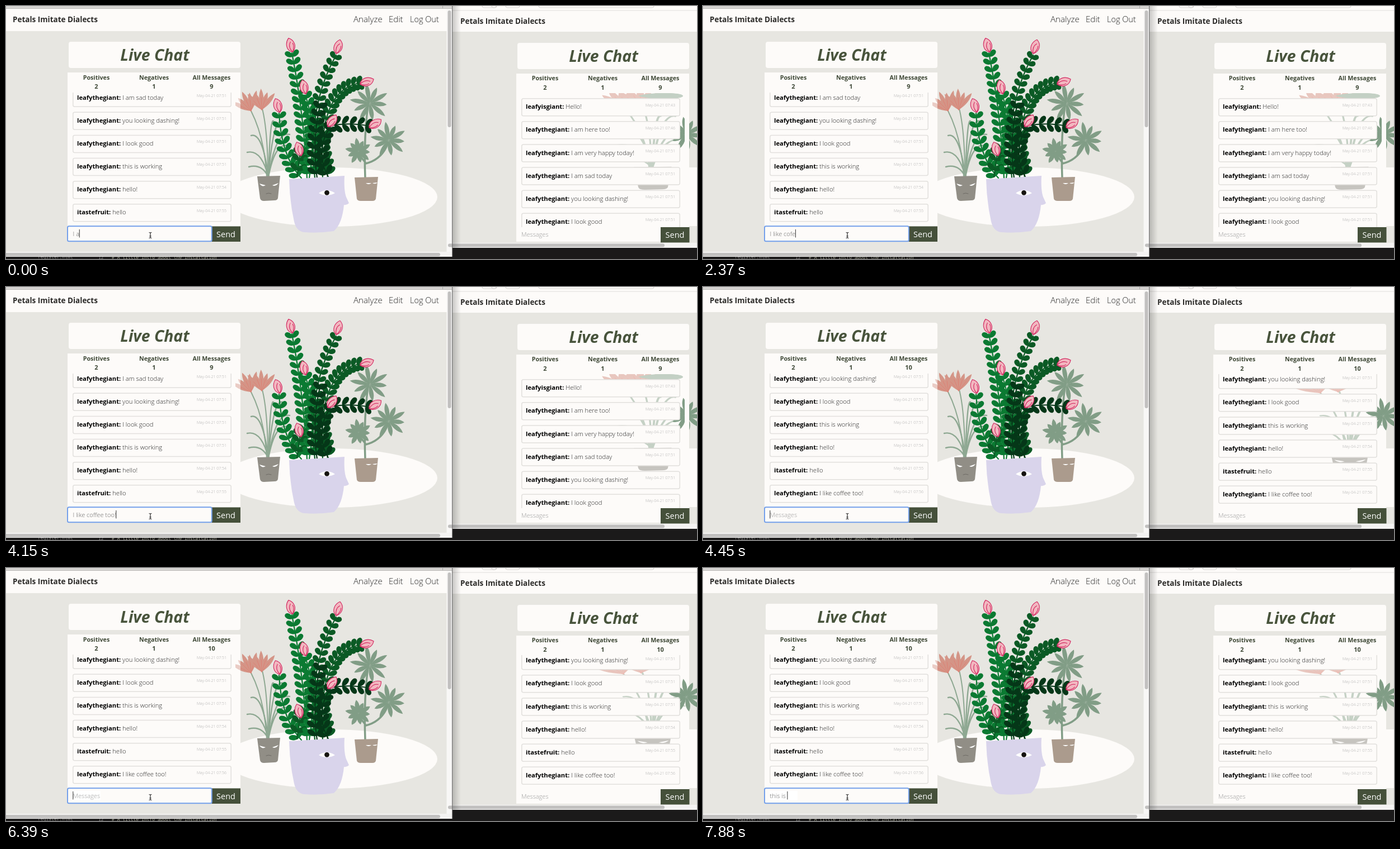
Recreate the animation shown at these times as an HTML page. Size 1235 by 453 pixels, loop 8 s.

```html
<!DOCTYPE html>
<html lang="en">
<head>
<meta charset="utf-8">
<title>Live Chat</title>
<style>
  html, body { margin: 0; width: 100%; height: 100%; overflow: hidden; background: #1b1a1a; }
  svg { display: block; font-family: "Open Sans", "Noto Sans", sans-serif; }
  text { white-space: pre; }
  .light { font-weight: 300; }
  .bold { font-weight: 700; }
</style>
</head>
<body>
<svg id="stage" width="1235" height="453" viewBox="0 0 1235 453"></svg>
<script>
const PAPER = '#fdfbf9', WALL = '#e7e6e1', OLIVE = '#45503a';
const DEG = Math.PI / 180;

const rect = (x, y, w, h, fill, more = '') =>
  `<rect x="${x}" y="${y}" width="${w}" height="${h}" fill="${fill}" ${more}/>`;
const text = (x, y, size, str, fill = '#222', cls = 'light', more = '') =>
  `<text x="${x}" y="${y}" font-size="${size}" fill="${fill}" class="${cls}" ${more}>${str}</text>`;
const path = (d, fill, more = '') => `<path d="${d}" fill="${fill}" ${more}/>`;
const line = (d, color, width) =>
  path(d, 'none', `stroke="${color}" stroke-width="${width}" stroke-linecap="round"`);
const MIDDLE = 'text-anchor="middle"';

// Plants
const leaf = (x, y, len, wide, angle, fill) =>
  path(`M0 0C${len * .25} ${-wide} ${len} ${-wide} ${len} 0C${len} ${wide} ${len * .25} ${wide} 0 0`,
    fill, `transform="translate(${x} ${y}) rotate(${angle})"`);

const blade = (x, y, len, wide, angle, fill) =>
  path(`M0 0Q${len * .6} ${-wide} ${len} 0Q${len * .6} ${wide} 0 0`,
    fill, `transform="translate(${x} ${y}) rotate(${angle})"`);

function branch(x0, y0, cx, cy, x1, y1, fill, size = 17) {
  const n = Math.round((Math.hypot(cx - x0, cy - y0) + Math.hypot(x1 - cx, y1 - cy)) / 14.5);
  let out = line(`M${x0} ${y0}Q${cx} ${cy} ${x1} ${y1}`, fill, 2.2);
  for (let i = 1; i <= n; i++) {
    const t = (i - .5) / n, u = 1 - t;
    const x = u * u * x0 + 2 * u * t * cx + t * t * x1;
    const y = u * u * y0 + 2 * u * t * cy + t * t * y1;
    const dir = Math.atan2(u * (cy - y0) + t * (y1 - cy), u * (cx - x0) + t * (x1 - cx)) / DEG;
    const len = size * (1.1 - .2 * t);
    out += leaf(x, y, len, 6.2, dir - 50, fill) + leaf(x, y, len, 6.2, dir + 50, fill);
  }
  return out;
}

const bud = (x, y, angle) => `<g transform="translate(${x} ${y}) rotate(${angle})" stroke="#d3265f" stroke-width="1.1">` +
  path('M0 13C-11 7-9-6-1-13C8-8 11 5 0 13', '#f2b7c0') + path('M0 13C-4 5-3-2 1-6M0 13C5 6 5 0 4-3', 'none') + '</g>';

const palm = (x, y, len, fill) =>
  [-170, -135, -100, -65, -30, 5, 40, 80, 120, 155]
    .map((a, i) => blade(x, y, len * (i % 2 ? .85 : 1), 8, a, fill)).join('');

function lily() {
  const green = '#8ea892', red = '#d49587';
  const tips = [[434, 288], [431, 262], [438, 232], [478, 206], [494, 206], [507, 230], [504, 250]];
  let out = tips.map(([x, y]) => line(`M469 306Q${(x + 2 * 469) / 3} ${y - 6} ${x} ${y}`, green, 2.4)).join('');
  out += line('M466 306Q462 235 438 188M468 306Q468 220 457 180', green, 2);
  for (const [x, y, first] of [[438, 188, -155], [457, 186, -132]])
    for (let i = 0; i < 5; i++) {
      const a = first + i * 20, c = Math.cos(a * DEG), s = Math.sin(a * DEG);
      out += blade(x, y, 38 - i % 2 * 5, 8, a, red) + line(`M${x} ${y}l${22 * c} ${22 * s}`, '#e1786c', .7);
    }
  return out + path('M449 305L490 304L486 344Q485 348 480 348L461 349Q455 349 454 344Z', '#918e86') +
    path('M453 318l11 3q-6 4-11-3M487 317l-11 4q6 3 11-4', '#fff') +
    line('M465 336q4-2 9 0', '#6e6b65', 1);
}

function tree() {
  const green = '#819d86';
  return line('M642 308Q639 230 648 172M642 280Q635 270 626 262M643 282Q672 275 683 245', green, 3.5) +
    palm(650, 174, 36, green) + palm(630, 260, 24, green) + palm(684, 240, 33, green) +
    path('M623 307L665 306L661 345Q660 349 655 349L634 349Q628 349 627 345Z', '#ab9b8d') +
    path('M643 317l10 0q-5 4-10 0M655 317l9-1q-4 4-9 1', '#fff');
}

function headPlant() {
  const bright = '#0b7a32', mid = '#0b5a25', dark = '#053718';
  return branch(538, 308, 532, 190, 511, 84, bright) + branch(528, 308, 492, 270, 488, 192, bright) +
    branch(552, 308, 538, 180, 590, 88, mid, 15) + branch(566, 308, 556, 150, 632, 138, mid) +
    branch(575, 308, 572, 260, 550, 215, mid) + branch(520, 306, 525, 270, 526, 262, mid) +
    branch(542, 308, 556, 220, 535, 160, bright) + branch(556, 308, 546, 240, 562, 175, dark) +
    branch(580, 214, 615, 208, 650, 215, dark) + branch(577, 308, 550, 260, 580, 216, dark) +
    bud(509, 70, -14) + bud(594, 73, 18) + bud(645, 136, 72) + bud(533, 145, -12) +
    bud(660, 211, 58) + bud(583, 206, 38) + bud(486, 178, -16) + bud(524, 256, -16) +
    path('M506 310L605 304C604 320 605 334 608 342L613 353Q609 357 604 356C602 378 596 394 586 403Q560 407 532 405Q519 403 515 386Q507 350 506 310Z', '#d9d4eb') +
    path('M559 335Q573 325 588 335Q573 343 559 335', '#fff') + '<circle cx="573.5" cy="334.3" r="4.4" fill="#15130f"/>';
}

// Chat
const ME = 'leafythegiant', OTHER = 'itastefruit';
const messages = [
  ['leafyisgiant', 'Hello!', 43], [ME, 'I am here too!', 46], [ME, 'I am very happy today!', 51],
  [ME, 'I am sad today', 51], [ME, 'you looking dashing!', 51], [ME, 'I look good', 51],
  [ME, 'this is working', 51], [ME, 'hello!', 54], [OTHER, 'hello', 55], [ME, 'I like coffee too!', 56]
];

const cards = (x, y, first) => messages.slice(first, first + 6).map(([who, what, minute], i) => {
  const top = y + i * 41.1;
  return rect(x + .75, top + .75, 282.5, 31, PAPER, 'stroke="#e2e0dd" stroke-width="1.5" rx="3"') +
    text(x + 8, top + 19.3, 11.2, `<tspan class="bold" fill="#000">${who}:</tspan> ${what}`) +
    text(x + 275, top + 14.5, 7, `May-04-21 07:${minute}`, '#aaa', 'light', 'text-anchor="end"');
}).join('');

const stats = (x, y, total) => [['Positives', 2], ['Negatives', 1], ['All Messages', total]].map(([name, n], i) =>
  text(x + i * 103, y, 10.7, name, '#3d4735', 'bold', MIDDLE) +
  text(x + i * 103, y + 16.5, 11, n, '#3d4735', 'bold', MIDDLE)).join('');

const heading = (x, y) => rect(x, y, 307, 47, PAPER, 'rx="4"') +
  text(x + 154, y + 33.5, 28.3, 'Live Chat', '#48543c', 'bold', MIDDLE + ' font-style="italic"');
const sendButton = (x, y) => rect(x, y, 51.5, 27.5, OLIVE) + text(x + 25.5, y + 19, 14.5, 'Send', '#fff', '', MIDDLE);
const brand = (x, y) => text(x, y, 13.5, 'Petals Imitate Dialects', '#2b2a28', 'bold');

function rightWindow() {
  return rect(798, 0, 437, 433, WALL) + rect(798, 0, 437, 46, PAPER) + rect(798, 7.5, 437, 1, '#e0dedc') +
    [[851, 25], [868, 9], [893, 25], [952, 206]].map(([x, w]) =>
      rect(x, -8, w, 11, 'none', 'stroke="#d5d3d1" rx="3"')).join('') +
    brand(812, 32) + heading(914, 66) +
    rect(1221, 289, 14, 105, PAPER) + rect(912, 121, 309, 275, PAPER);
}

function rightChat(sent) {
  const faint = `<g opacity=".5" transform="translate(381 ${sent ? 17 : 8}) scale(1.65 .92)">${lily()}</g>`;
  return `<g clip-path="url(#rightArt)">${faint}${palm(1216, 230, 32, '#819d86')}` +
    (sent ? '' : leaf(1130, 161, 80, 7, 0, '#c3d0c4') + rect(1213, 166, 8, 230, PAPER)) + '</g>' +
    `<g clip-path="url(#rightList)">${cards(921, sent ? 150 : 165, sent ? 4 : 0)}</g>` + stats(963.5, 133, sent ? 10 : 9);
}

function leftWindow() {
  return rect(0, 0, 797, 449, PAPER) + rect(0, 0, 797, 4.5, '#d6d4d2') + rect(780, 0, 1, 4.5, '#aaa') +
    rect(0, 4, 797, 1, '#bbb9b7') + rect(0, 45, 788, 395, WALL) + brand(12, 28.5) +
    text(621, 29, 15.2, 'Analyze') + text(684, 29, 15, 'Edit') + text(722, 29, 14.5, 'Log Out') +
    `<ellipse cx="580" cy="342" rx="191" ry="53" fill="${PAPER}"/>` + tree() + lily() + headPlant() +
    heading(112, 64) + rect(110, 119, 309, 303, PAPER) +
    `<g opacity=".45" clip-path="url(#petals)">${lily()}</g>` +
    rect(787.5, 5, 9.5, 436, '#f8f7f6') + rect(789.5, 8, 6, 209, '#c1c0bf', 'rx="3"') +
    rect(0, 440, 797, 9, '#f4f3f2') + rect(-5, 442, 781, 6, '#c1c0bf', 'rx="3"');
}

const leftChat = sent => `<g clip-path="url(#leftList)">${cards(119, 148.5, sent ? 4 : 3)}</g>` + stats(161.5, 131.5, sent ? 10 : 9);
const clip = (id, x, y, w, h) => `<clipPath id="${id}">${rect(x, y, w, h, '#000')}</clipPath>`;
const phase = (id, sent) => `<g id="${id}">${rightChat(sent)}${leftChat(sent)}</g>`;

document.getElementById('stage').innerHTML =
  `<defs>${clip('leftList', 110, 155, 309, 239)}${clip('rightList', 912, 156, 309, 240)}` +
  `${clip('rightArt', 1040, 156, 195, 240)}${clip('petals', 410, 119, 9, 100)}` +
  '<linearGradient id="shade"><stop stop-opacity=".22"/><stop offset="1" stop-opacity="0"/></linearGradient></defs>' +
  rect(0, 0, 1235, 453, '#1b1a1a') +
  `<g font-family="'DejaVu Sans Mono', monospace">` +
  text(57, 452, 8, 'register.html', '#8a8a88', '') + text(165, 453, 8, '12', '#777', '') +
  text(189, 453, 8, '# A little intro about the installation', '#9a9b8c', '') + '</g>' +
  rightWindow() + leftWindow() + phase('before', false) + phase('after', true) +
  rect(912, 396, 258, 26, PAPER) + text(921, 413, 11, 'Messages', '#9a9a9a') + sendButton(1170, 396) +
  rect(798, 424, 437, 9, '#f4f3f2') + rect(790, 425.5, 387, 6, '#c1c0bf', 'rx="3"') +
  rect(797, 0, 16, 433, 'url(#shade)') + rect(797, 0, 1.2, 449, '#777') +
  sendButton(367.5, 394.5) + rect(110, 394.3, 257.8, 27, PAPER, 'stroke="#74a0ea" stroke-width="2" rx="2.5"') +
  rect(119, 399, 50, 17, '#fff', 'id="patch"') + text(119.5, 411.5, 11, '', '#666', 'light', 'id="typed"') +
  rect(0, 400, 1, 14.5, '#333', 'id="caret"') +
  line('M256 405.5Q258 405.5 258 407V414Q258 415.5 256 415.5M260 405.5Q258 405.5 258 407M258 414Q258 415.5 260 415.5M256.7 412h2.6', '#222', 1.1);

// Typing: [time, text]; the caret blinks while the field is empty
const keys = [
  [0, 'I a'], [150, 'I am'], [440, 'I a'], [590, 'I'], [740, 'I '],
  [1040, 'I l'], [1190, 'I li'], [1330, 'I lik'], [1480, 'I like'], [1620, 'I like '],
  [1920, 'I like c'], [2070, 'I like co'], [2220, 'I like cof'], [2370, 'I like cofe'],
  [2820, 'I like cof'], [2970, 'I like coff'], [3110, 'I like coffee'], [3260, 'I like coffee '],
  [3410, 'I like coffee t'], [3550, 'I like coffee to'], [3700, 'I like coffee too'], [4150, 'I like coffee too!'],
  [4450, ''], [5650, 'T'], [5940, ''], [6240, 'T'], [6390, ''], [6680, 'T'], [6830, ''],
  [6980, 't'], [7130, 'th'], [7430, 'thi'], [7580, 'this '], [7730, 'this i'], [7880, 'this is ']
];
const LOOP = 8000, SENT = 4450;
const [before, after, patch, typed, caret] =
  ['before', 'after', 'patch', 'typed', 'caret'].map(id => document.getElementById(id));
const show = (el, on) => el.setAttribute('visibility', on ? 'visible' : 'hidden');

function draw(now) {
  const t = now % LOOP;
  const value = keys.findLast(([at]) => at <= t)[1];
  typed.textContent = value;
  const width = typed.getComputedTextLength();
  if (!value) typed.textContent = 'Messages';
  typed.setAttribute('fill', value ? '#666' : '#9a9a9a');
  caret.setAttribute('x', 119.3 + width);
  show(caret, !(t >= 4900 && t < 5350));
  show(before, t < SENT);
  show(after, t >= SENT);
  show(patch, t >= 5650);
  requestAnimationFrame(draw);
}
requestAnimationFrame(draw);
</script>
</body>
</html>
```
